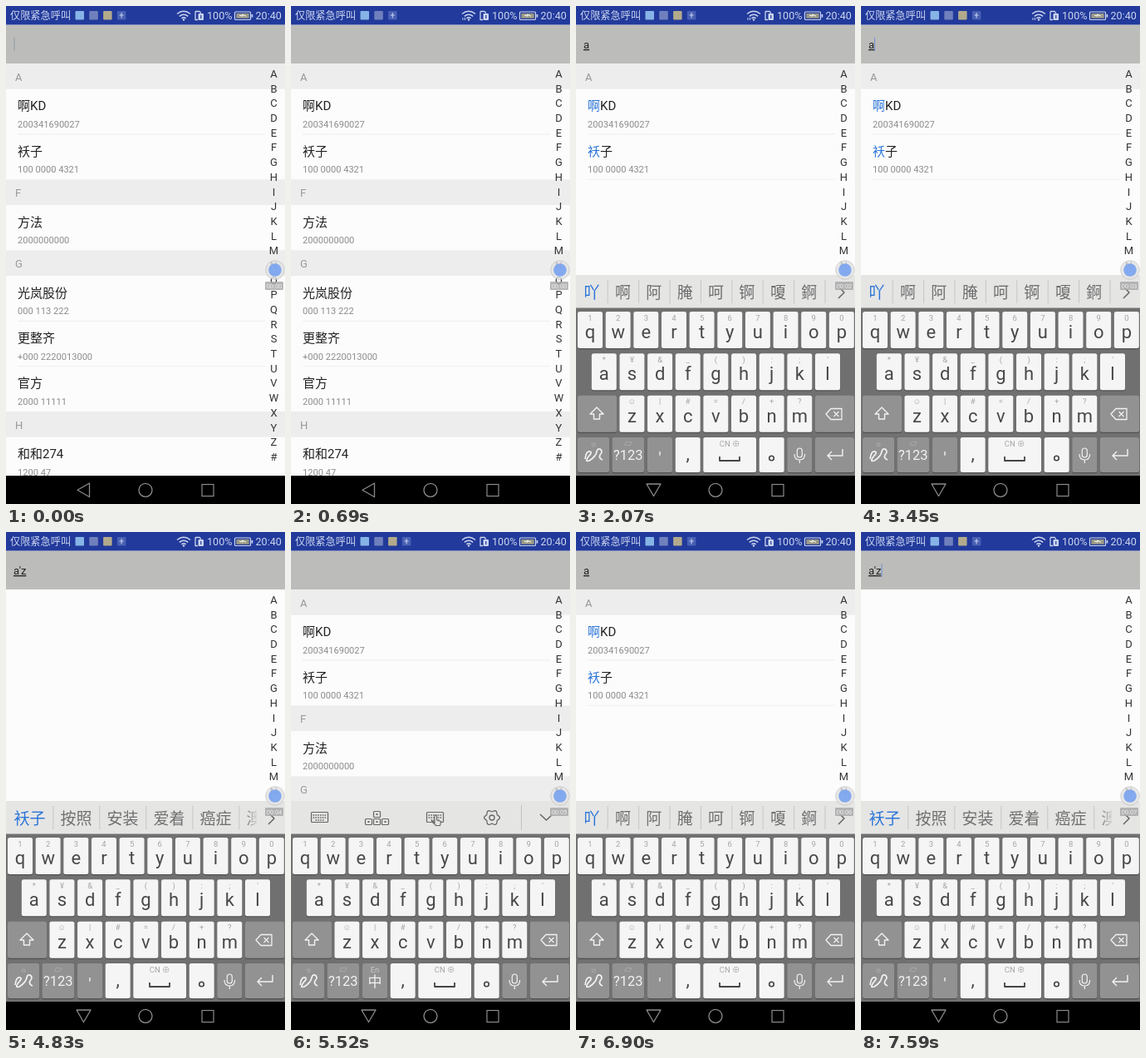
An HTML page for the animation above (8 s loop, 336 by 598 pixels).

```html
<!DOCTYPE html>
<html lang="zh-CN">
<head>
<meta charset="utf-8">
<title>Contacts search</title>
<style>
html, body { margin: 0; width: 100%; height: 100%; overflow: hidden; background: #fcfcfc; }
svg { display: block; width: 336px; height: 598px; font-family: Roboto, "Noto Sans CJK SC", "Noto Sans CJK", sans-serif; }
text { white-space: pre; }
</style>
</head>
<body>
<svg id="stage" viewBox="0 0 336 598"></svg>
<script>
const STEP = 690, LOOP = 8000;
const QUERIES = ["", "", "", "a", "a", "a", "a'z", "a'z", "", "", "a", "a'z"];
const CURSOR = [0, 4, 5, 6, 11];
const BLUE = "#2a74d8";

const rect = (x, y, w, h, fill, more = "") =>
  `<rect x="${x}" y="${y}" width="${w}" height="${h}" fill="${fill}" ${more}/>`;
const text = (x, y, size, fill, s, more = "") =>
  `<text x="${x}" y="${y}" font-size="${size}" fill="${fill}" ${more}>${s}</text>`;
const mid = (x, y, size, fill, s) => text(x, y, size, fill, s, 'text-anchor="middle"');
const line = (d, color, width = 1.2, fill = "none") =>
  `<path d="${d}" stroke="${color}" stroke-width="${width}" fill="${fill}" stroke-linejoin="round"/>`;
const circle = (x, y, r, fill, more = "") => `<circle cx="${x}" cy="${y}" r="${r}" fill="${fill}" ${more}/>`;
const box = (x, y, w, h, color, r = 1) =>
  rect(x, y, w, h, "none", `rx="${r}" stroke="${color}" stroke-width="1.2"`);
const repeat = (n, f) => Array.from({ length: n }, (_, i) => f(i)).join("");

const SECTIONS = [
  ["A", ["啊KD", "200341690027"], ["袄子", "100 0000 4321"]],
  ["F", ["方法", "2000000000"]],
  ["G", ["光岚股份", "000 113 222"], ["更整齐", "+000 2220013000"], ["官方", "2000 11111"]],
  ["H", ["和和274", "1200 47"]]
];

function contacts(query) {
  if (query.length > 1) return "";
  let y = 69, out = "";
  for (const [letter, ...rows] of query ? SECTIONS.slice(0, 1) : SECTIONS) {
    out += rect(0, y, 336, 30.7, "#ededed") + text(11, y + 21, 13, "#999", letter);
    y += 30.7;
    rows.forEach(([name, phone], i) => {
      const label = query ? `<tspan fill="${BLUE}">${name[0]}</tspan>${name.slice(1)}` : name;
      out += text(14, y + 25.6, 15, "#222", label) + text(14, y + 46.4, 11.1, "#8c8c8c", phone);
      y += 54.3;
      if (query || i < rows.length - 1) out += rect(14, y - .5, 298, 1, "#eee");
    });
  }
  return out;
}

const indexBar = () => [..."ABCDEFGHIJKLMNOPQRSTUVWXYZ#"]
  .map((c, i) => mid(322.5, 86 + i * 17.69, 13, "#333", c)).join("");

function statusBar(i) {
  const c = "#cbd5ef", icons = ["#86b4e6", "#6f80bd", "#b3aa8c", "#4860b4"];
  if (i == 1) icons.splice(2, 1);
  const plusX = 83.5 + (icons.length - 1) * 16.8;
  let out = rect(0, 0, 336, 22.5, "#223a9b") + text(5, 16, 12.2, c, "仅限紧急呼叫");
  out += icons.map((fill, n) => rect(83.5 + n * 16.8, 6, 10.5, 10.5, fill, 'rx="1"')).join("");
  out += line(`M${plusX + 5.2} 8v6.5m-2.5-3.5h5`, c, 1);
  out += line("M206 9.5q8-6.5 16 0M208.8 12.3q5.2-4.2 10.4 0M211.4 14.8q2.6-2 5.2 0", c, 1.5) + circle(214, 16.5, 1.2, c);
  if (i > 0 && i < 7) out += line("M207 14v3m2.5-3v3", c, 1);
  out += line("M228 6.5h5l2 2M228 6.5v10h3", c, 1.3) + rect(231.5, 9, 6.5, 8, c, 'rx="1"') + rect(234.2, 11, 1.2, 4, "#223a9b");
  out += text(242, 16, 12.6, c, "100%") + text(300.5, 16, 12.6, c, "20:40");
  out += box(275.5, 7, 19, 9.5, c) + rect(277.3, 8.8, 15.4, 6, "#9b9a85") + rect(295.5, 10, 1.8, 3.6, c);
  return out + line("M281 11l4 1.2-.5-2 4.5 2", "#fff", 1);
}

function searchBar(query, cursor) {
  const x = query ? [16.5, 25][query.length >> 1] : 10;
  let out = rect(0, 22.5, 336, 46.5, "#bcbcba");
  if (query) out += text(9, 51, 13, "#222", query, 'text-decoration="underline"');
  if (cursor) out += rect(x - .5, 38, 1, 16, query ? "#6b8fd0" : "#8f9aa5");
  return out;
}

function toolbar() {
  const c = "#666";
  const board = x => box(x, 336.5, 20, 12, c) +
    line(`M${x + 2} 340h16M${x + 2} 343h16M${x + 5} 346h10`, c, 1.3).replace("/>", ' stroke-dasharray="1.6 1.2"/>');
  const block = (x, y) => box(x, y, 8, 7, c) + rect(x + 3, y + 2.5, 2, 2, c);
  let gear = "";
  for (let k = 0; k <= 48; k++) {
    const a = k / 48 * 2 * Math.PI, r = 8.3 + 1.1 * Math.cos(6 * a);
    gear += `${k ? "L" : "M"}${(242 + r * Math.cos(a)).toFixed(1)} ${(343 + r * Math.sin(a)).toFixed(1)}`;
  }
  return board(24.5) + block(99.5, 335.5) + repeat(3, k => block(89.5 + k * 10, 344.5)) +
    board(163.5) + line("M173 350v-9q1.3-2 2.6 0v5l5 1.5-1 5h-5l-5-5q1-2 3.4 2.5", c, 1.1, "#e5e5e4") +
    line(gear + "Z", c, 1.3) + circle(242, 343, 3, "none", `stroke="${c}" stroke-width="1.3"`) +
    rect(277, 328, 1, 30, "#c2c2c2") + line("M300 339l7.5 7 7.5-7", c, 1.5);
}

function candidates(query) {
  const single = query.length == 1, pitch = single ? 37.4 : 56;
  const words = (single ? "吖 啊 阿 腌 呵 锕 嗄 錒" : "袄子 按照 安装 爱着 癌症 澳洲").split(" ");
  const items = words.map((w, i) =>
    text(9.5 + i * pitch, 351, 19, i ? "#707070" : BLUE, w) +
    rect((i + 1) * pitch + .3, 329, 1, 28, "#c6c6c6")).join("");
  return `<svg width="302" height="598">${items}</svg>` +
    (single ? "" : rect(288, 328, 16, 32, "url(#fade)")) +
    line("M316 337l7 7-7 7", "#666", 1.5);
}

function key(x, y, w, dark, label = "", hint = "", size = 22) {
  const h = y > 515 ? 42 : 44, cx = x + w / 2;
  return rect(x, y + 1.2, w, h, "#505050", 'rx="2.5"') +
    rect(x, y, w, h, dark ? "#929292" : "#f5f5f5", 'rx="2.5"') +
    mid(cx, y + 32, size, dark ? "#f2f2f2" : "#484848", label) +
    mid(cx, y + 10.5, 9.5, dark ? "#c8c8c8" : "#a5a5a5", hint);
}

function keyboard(query) {
  const white = "#f2f2f2", pitch = 33.65;
  const row = (x, y, letters, hints) => [...letters]
    .map((c, i) => key(x + i * pitch, y, 30, false, c, hints[i])).join("");
  let out = rect(0, 323, 336, 40, "#e5e5e4") + rect(0, 362.5, 336, 202, "#707070");
  out += query ? candidates(query) : toolbar();
  out += row(2, 367, "qwertyuiop", "1234567890") +
    row(18.8, 417.3, "asdfghjkl", "*¥&_():;'") + row(52.4, 467.8, "zxcvbnm", "☺|#=/+?");
  out += key(2, 467.8, 47, true) + line("M25 482l-8 8h4.5v6h7v-6h4.5z", white, 1.4);
  out += key(288, 467.8, 47, true) + line("M301 490l6-6.5h13v13h-13zM310.5 487l6 6m0-6l-6 6", white, 1.3);
  out += key(2, 518, 38, true, "", "☼") +
    line("M11 544q1-10 6-9 3 1-2 6-5 7 1 5 8-5 9-11 1-4 4-3 4 3 0 7-2 4 3 6", white, 1.7);
  out += key(43.5, 518, 38.5, true, "?123", "▱", 16.5).replace('y="550"', 'y="545"');
  out += query ? key(86, 518, 30, true, "'", "", 20) :
    key(86, 518, 30, true, "中", "En", 17).replace('y="550"', 'y="546"');
  out += key(119.7, 518, 30, false, ",").replace('y="550"', 'y="545"') + key(153.3, 518, 63.7, false, "", "CN ⊕") +
    line("M173 541v5h24v-5", "#444", 1.8);
  out += key(220.7, 518, 30, false) + circle(235.5, 543, 2.8, "none", 'stroke="#444" stroke-width="1.6"');
  out += key(254.3, 518, 30, true) + rect(266.3, 531, 6, 11, "none", `rx="3" stroke="${white}" stroke-width="1.2"`) +
    line("M263 538q0 7 6.3 7t6.3-7M269.3 545v4", white);
  out += key(288, 518, 47, true) + line("M321 532v8h-18m5-5l-5 5 5 5", white, 1.4);
  return out;
}

const navBar = open => rect(0, 564, 336, 34, "#000") +
  line(open ? "M85 574h17l-8.5 14.5z" : "M100.5 573v16.5l-14.5-8.2z", "#8a8a8a", 1.3) +
  circle(168, 581.3, 8, "none", 'stroke="#8a8a8a" stroke-width="1.3"') + box(236, 574.5, 14, 14, "#8a8a8a", 0);

const recorder = seconds => circle(324, 317, 11.3, "#e4e4e4", 'opacity=".8" stroke="#c4c4c4"') +
  circle(324, 317, 7.8, "#78a2ee", 'opacity=".9"') +
  rect(312, 331, 22, 10, "#aaa", 'rx="1" opacity=".85"') + mid(323, 339, 7.5, "#eee", "00:0" + seconds);

const FADE = `<linearGradient id="fade"><stop stop-color="#e5e5e4" stop-opacity="0"/><stop offset="1" stop-color="#e5e5e4"/></linearGradient>`;

function scene(i) {
  const query = QUERIES[i], open = i > 1;
  return FADE + rect(0, 0, 336, 598, "#fcfcfc") + contacts(query) + indexBar() +
    searchBar(query, CURSOR.includes(i)) + statusBar(i) + (open ? keyboard(query) : "") +
    navBar(open) + recorder(Math.floor(i * STEP / 1000));
}

const stage = document.getElementById("stage");
const start = performance.now();
let shown = -1;
function draw() {
  const i = Math.floor((performance.now() - start) % LOOP / STEP);
  if (i != shown) stage.innerHTML = scene(shown = i);
  requestAnimationFrame(draw);
}
draw();
</script>
</body>
</html>
```
